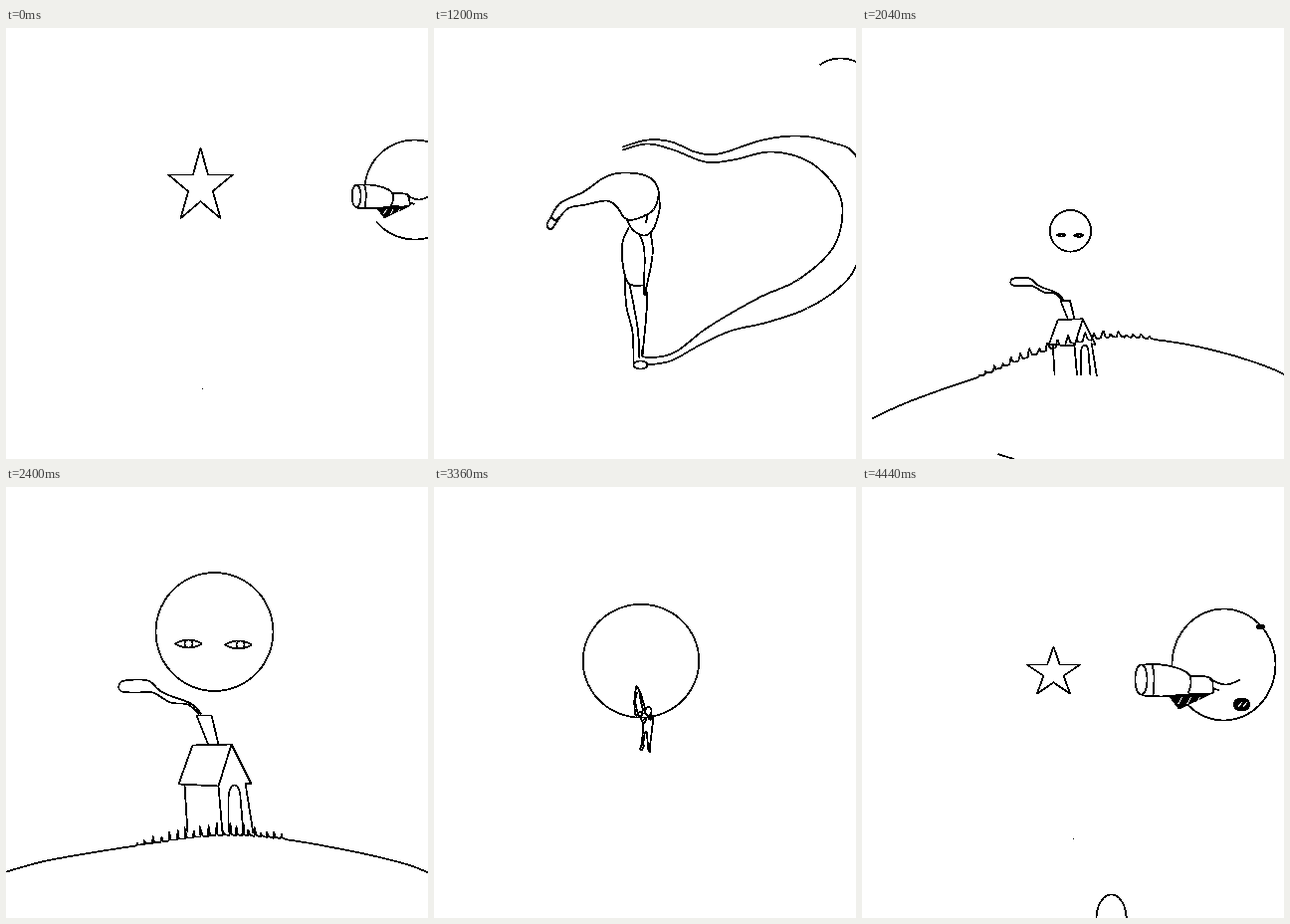
Animation, 424 px wide and 433 px high, one loop 4.5 s. Source, as an HTML page:

```html
<!DOCTYPE html>
<html lang="en">
<head>
<meta charset="utf-8">
<title>Line drawing loop</title>
<style>
html, body { margin: 0; width: 100%; height: 100%; overflow: hidden; background: #fff; }
svg { display: block; width: 100%; height: 100%; }
path { fill: none; stroke: #000; stroke-width: 1.8; stroke-linejoin: round; vector-effect: non-scaling-stroke; shape-rendering: crispEdges; }
path.ink { fill: #000; }
path.gap { stroke: #fff; stroke-width: 1; }
</style>
</head>
<body>
<svg id="stage" viewBox="-0.5 -0.5 424 433"></svg>
<script>
const LOOP = 4500, SAMPLES = 240;
const stage = document.getElementById('stage');
const tracks = [];

// ---- Strokes: every helper returns a list of points ----
const line = s => s.split(',').map(q => q.trim().split(' ').map(Number));
const loop = s => { const p = line(s); return [...p, p[0]]; };
const span = (n, f) => Array.from({ length: n + 1 }, (_, i) => f(i / n));
const mix = (a, b, f) => a + (b - a) * f;
const shift = (pts, dx, dy) => pts.map(([x, y]) => [x + dx, y + dy]);
const styled = (pts, cls) => Object.assign(pts, { cls });

// Smooth line through key points
function curve(s) {
  const p = line(s), n = p.length, out = [p[0]];
  const at = i => p[Math.max(0, Math.min(n - 1, i))];
  for (let i = 0; i < n - 1; i++) {
    const [a, b, c, d] = [at(i - 1), at(i), at(i + 1), at(i + 2)];
    for (let u = 1; u <= 10; u++) {
      const f = u / 10;
      out.push([0, 1].map(k => b[k] + f / 2 * (c[k] - a[k]
        + f * (2 * a[k] - 5 * b[k] + 4 * c[k] - d[k] + f * (3 * (b[k] - c[k]) + d[k] - a[k])))));
    }
  }
  return out;
}

// Part of an ellipse, clockwise, in degrees
const oval = (cx, cy, rx, ry = rx, from = 180, to = from + 360) => span(60, f => {
  const a = mix(from, to, f) * Math.PI / 180;
  return [cx + rx * Math.cos(a), cy + ry * Math.sin(a)];
});

const star = (cx, cy, rx, ry) => span(10, f => {
  const a = f * 2 * Math.PI, r = Math.round(f * 10) % 2 ? .38 : 1;
  return [cx + rx * r * Math.sin(a), cy - ry * r * Math.cos(a)];
});

const lens = (cx, cy, w, h) => span(30, f => {
  const a = f * 2 * Math.PI, s = Math.sin(a);
  return [cx + w / 2 * Math.cos(a), cy + h / 2 * s * Math.abs(s)];
});

// Cloud edge: humps between cusps, on the right of the way along
function scallops(s) {
  const p = line(s);
  return p.slice(1).flatMap(([x2, y2], i) => {
    const [x1, y1] = p[i];
    return span(10, f => {
      const h = .34 * Math.sin(f * Math.PI);
      return [mix(x1, x2, f) - (y2 - y1) * h, mix(y1, y2, f) + (x2 - x1) * h];
    });
  });
}

// Hill whose top breaks into blades of grass
function grassyHill() {
  let seed = 7;
  const rand = () => (seed = seed * 16807 % 2147483647) / 2147483647;
  return curve('0 386,45 374,130 360,210 350,275 353,350 366,400 378,424 387').flatMap(([x, y]) => {
    if (x < 130 || x > 275) return [[x, y]];
    const tall = 3 + rand() * 11 * Math.sin((x - 120) / 165 * Math.PI);
    return [[x, y], [x + 3 * rand() - 1, y - tall], [x + 2, y - 1]];
  });
}

// ---- Motion ----
const toPath = pts => 'M' + pts.map(p => p[0].toFixed(1) + ' ' + p[1].toFixed(1)).join('L');

// Points at even steps along the line
function resample(pts) {
  const dist = [0];
  for (let i = 1; i < pts.length; i++) {
    dist.push(dist[i - 1] + Math.hypot(pts[i][0] - pts[i - 1][0], pts[i][1] - pts[i - 1][1]));
  }
  const total = dist[dist.length - 1];
  let i = 1;
  return span(SAMPLES, f => {
    while (i < pts.length - 1 && dist[i] < f * total) i++;
    const u = (f * total - dist[i - 1]) / (dist[i] - dist[i - 1] || 1);
    return [0, 1].map(k => mix(pts[i - 1][k], pts[i][k], u));
  });
}

function add(tag, parent, cls) {
  const el = document.createElementNS('http://www.w3.org/2000/svg', tag);
  if (cls) el.setAttribute('class', cls);
  return parent.appendChild(el);
}

// Calls show(index, fraction) between keys and hides the element outside them.
function track(el, keys, show) {
  const end = keys[keys.length - 1][0];
  tracks.push(time => {
    const t = time < keys[0][0] ? time + LOOP : time;
    el.style.display = t < end ? '' : 'none';
    if (t >= end) return;
    let i = 0;
    while (t >= keys[i + 1][0]) i++;
    show(i, (t - keys[i][0]) / (keys[i + 1][0] - keys[i][0]));
  });
}

// One line changing shape; keys are [time, points].
function morph(...keys) {
  const el = add('path', stage), even = keys.map(k => resample(k[1]));
  track(el, keys, (i, f) => {
    const still = f === 0 || keys[i][1] === keys[i + 1][1];
    el.setAttribute('d', toPath(still ? keys[i][1] :
      even[i].map((p, n) => p.map((v, k) => mix(v, even[i + 1][n][k], f)))));
  });
}

// A drawing moved about a pivot; keys are [time, dx, dy, scale].
function group([px, py], strokes, ...keys) {
  const el = add('g', stage);
  for (const s of strokes) add('path', el, s.cls).setAttribute('d', toPath(s));
  track(el, keys, (i, f) => {
    const [x, y, s] = [1, 2, 3].map(k => mix(keys[i][k], keys[i + 1][k], f));
    el.setAttribute('transform', `translate(${px + x} ${py + y}) scale(${s}) translate(${-px} ${-py})`);
  });
}

// ---- Star, loosening into hair and then a slope ----
const nearStar = star(195, 159, 34, 39);
const hair = curve('117 189,127 175,150 164,172 149,192 145,215 149,225 163,220 182,204 191,192 191,183 179,173 173,152 177,134 181,123 194');
const slope = curve('136 256,170 271,220 320,255 382,275 433');
morph([4320, star(192, 184, 6, 6)], [4440, star(192, 186, 28, 26)], [4500, nearStar], [4620, nearStar],
  [4980, star(194, 190, 110, 118)], [5580, hair], [5700, hair], [6180, slope], [6600, shift(slope, 0, 200)]);

// ---- Ribbon edges, opening into hills and then lightning ----
const inner = curve('209 322,211 330,240 326,275 300,325 271,366 252,400 221,410 185,402 158,375 133,338 124,300 132,272 134,240 122,214 116,189 122');
const outer = curve('213 338,237 334,265 319,297 304,335 295,375 281,407 260,424 238,442 190,424 129,397 114,366 108,330 112,285 126,262 124,238 114,214 112,189 119');
const ridge = curve('38 410,66 338,100 289,150 246,198 218,272 191,345 190,385 203,424 230');
const fold = curve('198 218,270 237,335 277,400 341,424 382');
const farHill = curve('0 223,40 228,84 242,125 265');
const hill = grassyHill();
const boltL = line('67 44,123 103,85 99,158 171,142 168,158 181,134 178,216 249,198 247,320 383');
const boltR = line('171 58,211 133,166 121,234 189,206 196,275 273,246 264,320 383');
morph([660, line('209 322,211 330')], [1080, inner], [1200, inner], [1680, ridge], [2160, hill],
  [2520, hill], [2820, boltR], [2940, boltR], [3240, shift(boltR, 270, -60)]);
morph([2520, hill], [2820, boltL], [2940, boltL], [3240, shift(boltL, -330, 60)]);
morph([660, line('209 325,213 338')], [1080, outer], [1200, outer], [1680, fold], [2040, shift(fold, 0, 220)]);
morph([1440, shift(farHill, -140, 40)], [1680, farHill], [1980, shift(farHill, -130, 140)]);
group([100, 260], [curve('84 241,70 270,68 300,75 323'), curve('84 241,87 242,78 270,88 305'),
  curve('114 260,122 250,135 244,153 244')], [1500, 0, 40, .3], [1680, 0, 0, 1], [2040, 0, 200, 1]);

// ---- Standing figure ----
group([207, 300], [
  line('117 189,121 193,126 189'), curve('117 190,113 197,117 202,123 194'),
  curve('225 166,226 182,220 201,211 208,200 203,193 192'), line('211 187,214 189,212 196'),
  curve('195 200,189 215,189 235,195 256,211 258'),
  curve('206 207,211 225,210 268'), curve('217 205,219 228,211 269'),
  curve('191 250,193 280,199 305,200 335'), curve('196 257,204 300,206 332'),
  curve('213 262,213 285,209 328'), oval(207, 338, 7, 4)
], [720, 0, 0, .2], [1080, 0, 0, 1], [1200, 0, 0, 1], [1500, 60, 360, 3.2]);
group([410, 30], [oval(408, 66, 36, 36, 235, 300)], [1080, 20, -10, 1], [1200, 0, 0, 1], [1260, 0, 0, 1]);

// ---- House and moon ----
group([213, 352], [
  curve('194 228,182 218,165 216,147 206,132 206,116 205,113 199,119 194,142 194,157 206,185 217,196 228'),
  line('203 259,191 229,206 229,213 258'), loop('187 259,226 258,213 300,173 298'),
  line('226 258,246 298,240 297,248 348'), line('179 299,182 347'), line('213 300,217 347'),
  [[223, 346], ...oval(229, 312, 6, 13, 180, 360), [238, 347]]
], [1860, 0, 0, .1], [2160, 0, 0, 1], [2520, 0, 0, 1], [2700, 0, 0, .05]);
group([209, 145], [oval(209, 145, 59, 59.5), lens(183, 157, 27, 8), oval(183, 157, 4),
  lens(233, 158, 27, 8), oval(235, 158, 4)],
  [1980, 0, 65, .1], [2160, 0, 45, .85], [2400, 0, 0, 1], [2520, 0, 0, 1], [2760, -11, 38, .19]);

// ---- Ball and clouds ----
group([198, 183], [oval(198, 183, 11), line('190 177,206 190'), line('206 176,191 191'),
  line('189 182,198 180,208 182'), line('198 180,199 193')],
  [2760, 0, 0, 1], [2940, 0, 0, 1], [3300, 10, 0, 5.4]);
group([212, 216], [
  scallops('273 27,294 34,311 40,338 50,345 74,366 88,359 110,355 133,345 152'),
  [...scallops('36 245,20 231,20 211,25 167,28 156,31 133'), [54, 132]], line('35 244,45 240,64 240'),
  scallops('49 394,62 380,50 380,72 365,104 347,112 322,129 277,130 258,135 243,156 244'),
  scallops('293 262,306 264,299 274,298 290,305 304,330 308,360 318,384 317,403 313')
], [2760, 0, 0, .4], [2880, 0, 0, 1], [2940, 0, 0, 1], [3240, 0, 0, 2.8]);

// ---- Circle and the reaching figure ----
const disc = oval(203, 112, 43, 42);
group([203, 112], [disc], [3300, 5, 70, 1.4], [3840, 0, 0, 1], [4140, 0, 0, 1]);
group([215, 230], [
  curve('196 176,192 210,194 242,199 238,194 212,198 190'), curve('196 176,205 190,217 230'),
  curve('203 188,207 212,212 233'), oval(205, 241, 4, 5), oval(213, 235, 3, 4),
  oval(224, 234, 7, 10), styled(oval(229, 248, 5, 5), 'ink'),
  curve('201 244,211 262,209 312'), curve('235 250,231 285,227 318'),
  curve('212 310,215 287,220 283,223 318'), curve('211 263,217 257,218 250'), curve('207 256,213 254,216 249'),
  loop('208 311,205 321,209 323,214 313'), loop('222 317,227 327,228 317')
], [3300, -5, -20, .3], [3600, 0, 45, 1], [3840, 0, 0, 1], [3960, 0, 10, 1.1],
  [4140, 10, 120, 1.5], [4320, 25, 260, 2], [4440, 35, 340, 2.2]);
group([250, 420], [oval(250, 433, 15, 24, 180, 360), line('264 427,266 433'), line('212 352,212 353')],
  [4440, 0, 0, 1], [4500, 0, 0, 1]);
group([197, 361], [line('197 361,197 362')], [4500, 0, 0, 1], [4620, 0, 0, 1]);

// ---- Watcher with a spyglass ----
const farHead = oval(410, 162, 50, 50, 186, 500);
morph([4140, disc], [4440, oval(363, 178, 52, 56, 178, 498)], [4500, farHead], [4620, farHead],
  [4740, shift(farHead, 94, 0)]);
group([313, 194], [
  oval(280, 193, 6, 15), curve('291 178,293 190,292 209'),
  curve('280 178,300 178,318 182,328 188,330 197,327 207'), line('281 209,300 210,327 208'),
  curve('329 189,349 191,352 200,350 207,327 207'),
  curve('349 193,365 198,380 193'), curve('353 202,359 204'),
  styled(loop('309 210,350 207,318 222'), 'ink'),
  ...[317, 326, 335].map(x => styled(line(`${x} 218,${x + 4} 211`), 'gap'))
], [4260, -96, -40, .4], [4440, 0, 0, 1], [4500, 63, -25, .74], [4620, 63, -25, .74], [4740, 157, -25, .74]);
group([380, 200], [styled(oval(400, 140, 4, 2), 'ink'), styled(oval(381, 218, 8, 6), 'ink'),
  ...[377, 382].map(x => styled(line(`${x} 221,${x + 4} 216`), 'gap'))],
  [4380, -33, 0, 1], [4440, 0, 0, 1], [4500, 0, 0, 1]);

// Drawn on uneven beats: one long, four short
function beat(t) {
  const r = t % 360;
  return t - r + (r < 120 ? 0 : Math.floor(r / 60) * 60);
}

const start = performance.now();
function frame() {
  const t = beat((performance.now() - start) % LOOP);
  for (const draw of tracks) draw(t);
  requestAnimationFrame(frame);
}
frame();
</script>
</body>
</html>
```
